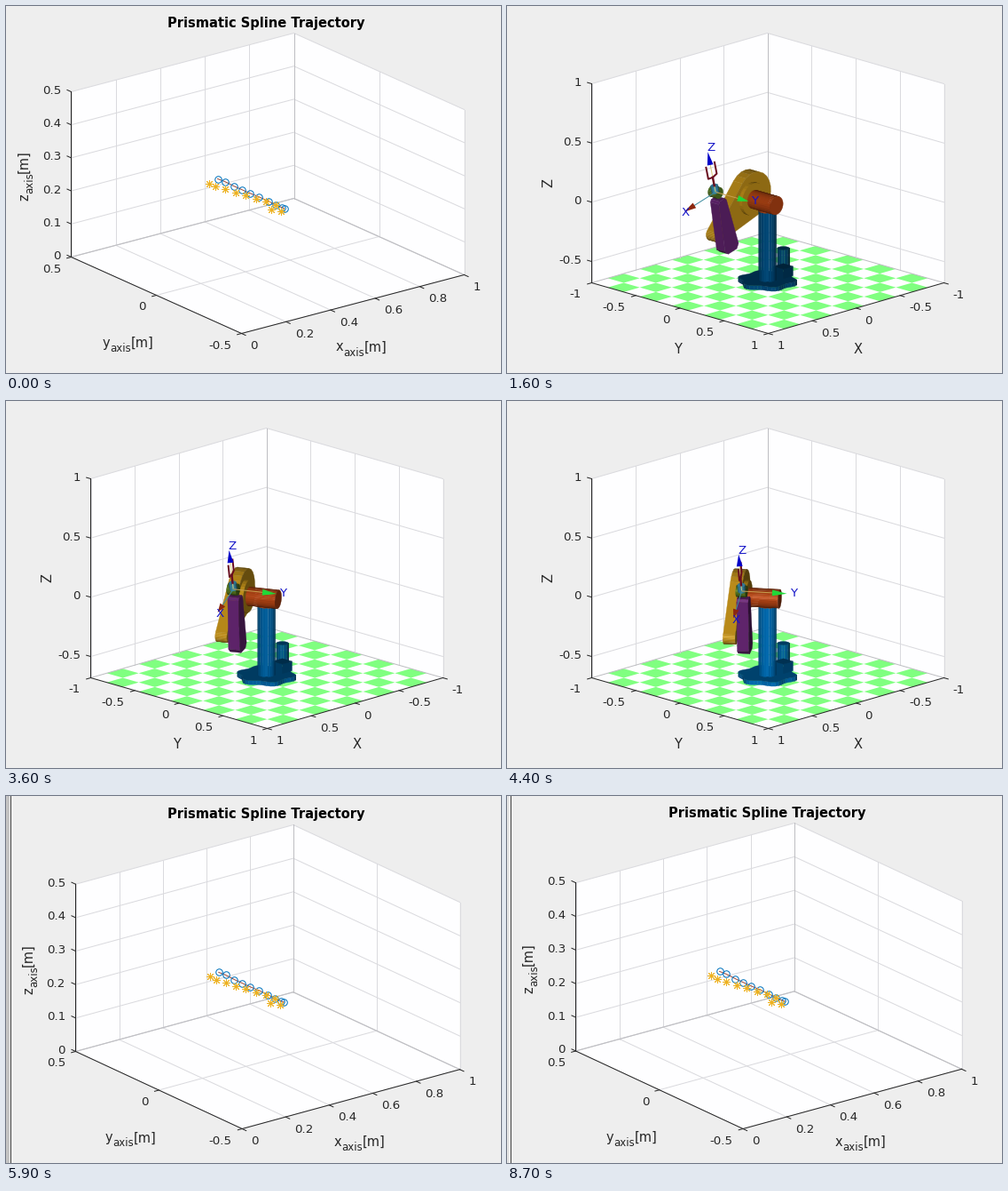
A matplotlib script that plays this animation: 558x413 px, repeating every 9000 ms.

```python
import numpy as np
import matplotlib.pyplot as plt
from matplotlib.animation import FuncAnimation
from matplotlib.collections import PolyCollection

W, H, DPI = 558, 413, 64
PX = 72 / DPI  # points per pixel
plt.rcParams["font.family"] = "DejaVu Sans"

fig = plt.figure(figsize=(W / DPI, H / DPI), dpi=DPI, facecolor="#eeeeee")
ax = fig.add_axes([0, 0, 1, 1])

INK, GRID, EDGE = "#262626", "#dadade", "#bebec2"
BLUE, ORANGE, OCHRE, PURPLE, GREEN, CYAN, RED = (np.array(c) / 255 for c in (
    (0, 114, 189), (217, 83, 25), (237, 177, 32), (126, 47, 142),
    (119, 172, 48), (77, 190, 238), (162, 20, 47)))


# ---------- 2D helpers, in pixels ----------
def line(pts, color, lw=1.0, **kw):
    p = np.asarray(pts, float) + 0.5
    ax.plot(p[:, 0], p[:, 1], color=color, lw=lw * PX, zorder=1, **kw)


def area(pts, color, **kw):
    ax.fill(*(np.asarray(pts, float) + 0.5).T, fc=color, lw=0, zorder=1, **kw)


def text(x, y, s, size=13.33, color=INK, **kw):
    ax.text(x, y, s, fontsize=size * PX, color=color, va="baseline", zorder=1,
            rotation_mode="anchor", **kw)


def axis_name(x, y, letter, upright=False):
    """Letter, lowered 'axis', then the unit."""
    first = 14.67 * (0.525 if letter == "z" else 0.592)
    parts = ((letter, 14.67, 0, 0), ("axis", 11.73, first, 5),
             ("[m]", 14.67, first + 23.5, 0))
    for s, size, run, drop in parts:
        if upright:
            text(x + drop, y - run, s, size, rotation=90)
        else:
            text(x + run, y + drop, s, size)


def chart(lb, fb, rb, h, left, right, up, tiles=0):
    """Open box from its left, front and right floor corners."""
    lb, fb, rb = (np.array(p, float) for p in (lb, fb, rb))
    a, b, z = fb - lb, rb - fb, np.array([0.0, -h])
    back = lb + b
    ua, ub = a / np.hypot(*a), b / np.hypot(*b)
    area([lb, lb + z, back + z, rb + z, rb, fb], "#fefeff")
    if tiles:
        cells = [[back + (i + p) * -b / tiles + (j + q) * a / tiles + 0.5
                  for p, q in ((0, 0), (1, 0), (1, 1), (0, 1))]
                 for i in range(tiles) for j in range(tiles) if (i + j) % 2]
        ax.add_collection(PolyCollection(cells, fc="#80ff80", ec="none", zorder=1))
    for f, _ in left:
        line([back + a * f + z, back + a * f], GRID)
        if not tiles:
            line([lb + a * f, rb - a * (1 - f)], GRID)
    for f, _ in right:
        line([lb + b * f + z, lb + b * f], GRID)
        if not tiles:
            line([lb + b * f, fb + b * f], GRID)
    for f, _ in up:
        line([lb + z * f, back + z * f, rb + z * f], GRID)
    line([lb, back, rb], EDGE)
    line([back, back + z], EDGE)
    line([lb + z, lb, fb, rb], INK)
    for f, s in left:
        p = lb + a * f
        line([p, p - ub * 5], INK)
        text(p[0] - 11, p[1] + 17.5, s, ha="right")
    for f, s in right:
        p = fb + b * f
        line([p, p + ua * 5], INK)
        text(p[0] + 10.5, p[1] + 18, s)
    for f, s in up:
        p = lb + z * f
        line([p, p - ua * 5], INK)
        text(p[0] - 11, p[1] + 3, s, ha="right")


# ---------- trajectory plot ----------
CIRCLES = np.array([(238, 194), (246, 197), (256, 202), (265, 206), (274, 210),
                    (284, 214), (295, 219), (303, 223), (310, 226), (313, 227)], float)
STARS = np.array([(228, 199), (235, 202), (246, 205), (258, 209), (269, 212),
                  (281, 216), (292, 219), (303, 223), (298, 228), (309, 230)], float)


def trajectory(x0, x1, y0, y1, title_y):
    sx, sy = (x1 - x0) / 443, (y1 - y0) / 337

    def fit(p):
        return (np.asarray(p, float) - (73, 31)) * (sx, sy) + (x0, y0)

    lb, fb, rb = fit((73, 282)), fit((265, 368)), fit((516, 302))
    h = 186 * sy
    chart(lb, fb, rb, h,
          [(0, "0.5"), (0.5, "0"), (1, "-0.5")],
          [(i / 5, f"{i / 5:g}") for i in range(6)],
          [(i / 5, f"{i / 10:g}") for i in range(6)])
    mx, my = (fb + rb) / 2, (lb + fb) / 2
    axis_name(mx[0] - 19, mx[1] + 53.5, "x")
    axis_name(my[0] - 60, my[1] + 59, "y")
    axis_name(lb[0] - 48, lb[1] - h / 2 + 30, "z", True)
    text(293.5, title_y, "Prismatic Spline Trajectory", 14.67, "black",
         weight="bold", ha="center")
    c, s = fit(CIRCLES), fit(STARS)
    line(c, "#a04a38")
    line(c, "#0072bd", 0, marker="o", ms=7.5 * PX, mfc="none", mew=PX)
    line(s, "#edb120", 0, marker=(8, 2, 0), ms=9 * PX, mew=PX)


# ---------- robot ----------
ORIGIN = np.array([293.2, 221.3])
PROJ = np.array([[-99, 28.5], [99.5, 28.5], [0, -133.0]])
VIEW = np.array([1, 1, 0.43])
LIGHT = np.array([0.65, 0.55, 0.35])
LIGHT = LIGHT / np.linalg.norm(LIGHT)
HALF = LIGHT + VIEW / np.linalg.norm(VIEW)
HALF = HALF / np.linalg.norm(HALF)
ARM, FORE, SIDE = 0.4318, 0.42, 0.13


def flat(p):
    return ORIGIN + np.asarray(p) @ PROJ


def shade(color, n, gain):
    lum = 0.3 + 0.5 * max(0, n @ LIGHT)
    gloss = 0.16 * max(0, n @ HALF) ** 40
    return tuple(np.clip((color * lum + gloss) * gain, 0, 1))


def solid(base, d, color, gain=1.0):
    """Extrude a 3D outline along d and paint the faces turned to the viewer."""
    base, d = np.asarray(base, float), np.asarray(d, float)
    mid = base.mean(0) + d / 2
    faces, tones = [], []
    for a, b in zip(base, np.roll(base, -1, 0)):
        n = np.cross(b - a, d)
        n = n / np.linalg.norm(n)
        if n @ ((a + b + d) / 2 - mid) < 0:
            n = -n
        if n @ VIEW > 0:
            faces.append(flat([a, b, b + d, a + d]) + 0.5)
            tones.append(shade(color, n, gain))
    n = d / np.linalg.norm(d)
    cap = base + d
    if n @ VIEW < 0:
        n, cap = -n, base
    faces.append(flat(cap) + 0.5)
    tones.append(shade(color, n, gain))
    ax.add_collection(PolyCollection(faces, fc=tones, ec=tones, lw=0.4, zorder=1))


def disc(r, n=28, lobes=0.0):
    t = np.arange(n) * 2 * np.pi / n
    k = r + lobes * np.cos(6 * t)
    return np.c_[k * np.cos(t), k * np.sin(t)]


def taper(c1, r1, c2, r2, n=14):
    """Outline around two circles lying on one axis."""
    b = np.arccos((r1 - r2) / (c2 - c1))
    t1, t2 = np.linspace(b, 2 * np.pi - b, n), np.linspace(-b, b, n)
    return np.r_[np.c_[c1 + r1 * np.cos(t1), r1 * np.sin(t1)],
                 np.c_[c2 + r2 * np.cos(t2), r2 * np.sin(t2)]]


def upright(xy, z0, z1, color, gain, at=(0, 0)):
    base = np.c_[xy + np.array(at), np.full(len(xy), z0)]
    solid(base, (0, 0, z1 - z0), color, gain)


FORE_HALF = np.array([(-0.115, 0.05), (-0.08, 0.08), (0.34, 0.045), (0.36, 0.03)])
FORE_SHAPE = np.r_[FORE_HALF, FORE_HALF[::-1] * (1, -1)]
BLOCK = np.array([(-0.055, -0.055), (0.055, -0.055), (0.055, 0.055), (-0.055, 0.055)])


def robot(yaw, reach, height, tilt, gain):
    yaw, tilt = np.radians([yaw, tilt])
    ex = np.array([np.cos(yaw), np.sin(yaw), 0])
    ey = np.array([-np.sin(yaw), np.cos(yaw), 0])
    ez = np.array([0, 0, 1.0])

    def plate(shape, y0, y1, color, angle=0.0, at=(0, 0)):
        c, s = np.cos(angle), np.sin(angle)
        r = at[0] + shape[:, 0] * c - shape[:, 1] * s
        z = at[1] + shape[:, 0] * s + shape[:, 1] * c
        solid(np.outer(r, ex) + np.outer(z, ez) + y0 * ey, (y1 - y0) * ey, color)

    # Two-link inverse kinematics, elbow low
    dist = np.hypot(reach, height)
    inner = np.arccos((dist**2 + ARM**2 - FORE**2) / (2 * dist * ARM))
    lift = np.arctan2(height, reach) - inner
    elbow = ARM * np.cos(lift), ARM * np.sin(lift)
    lean = np.arctan2(height - elbow[1], reach - elbow[0])

    # Pedestal and arm
    upright(disc(0.222, 48, 0.02), -0.675, -0.64, BLUE, gain)
    upright(disc(0.048), -0.59, -0.42, BLUE, gain * 0.9, (-0.18, 0))
    upright(BLOCK, -0.66, -0.58, BLUE, gain * 0.75, (-0.195, -0.015))
    plate(taper(-0.05, 0.185, ARM, 0.055), -0.285, -0.185, OCHRE, lift)
    plate(disc(0.135), -0.185, -0.15, OCHRE)
    upright(disc(0.072, 20), -0.645, -0.055, BLUE, gain)
    upright(disc(0.072), -0.065, -0.03, ORANGE, 1)
    plate(disc(0.076), -0.15, 0.1, ORANGE)
    plate(FORE_SHAPE, -0.165, -0.07, PURPLE, lean, elbow)
    plate(disc(0.046), -0.17, -0.09, GREEN * 0.85, 0, (reach, height))

    # Tool
    root = reach * ex - SIDE * ey + height * ez
    tx = np.cos(tilt) * ex - np.sin(tilt) * ez
    tz = np.sin(tilt) * ex + np.cos(tilt) * ez
    ring = disc(0.03, 16)
    solid(root + np.outer(ring[:, 0], tx) + np.outer(ring[:, 1], ey), 0.06 * tz, CYAN)

    def tool(x, z):
        return flat(root + x * tx + z * tz)

    axes = ((tz, "#d8c878", "#0000c8", "Z"), (ey, "#c8a050", "#20d838", "Y"),
            (tx, "#3c8ca0", "#8c2810", "X"))
    o = flat(root)
    for v, thin, _, _ in axes:
        line([o, flat(root + 0.26 * v)], thin)
    dark = tuple(RED * 0.65)
    line([tool(0, 0.06), tool(0, 0.135)], dark, 2.4)
    for s in (-1, 1):
        line([tool(0, 0.135), tool(s * 0.05, 0.145), tool(s * 0.05, 0.25)], dark, 2)
    for v, _, cone, s in axes:
        tip, foot = flat(root + 0.37 * v), flat(root + 0.25 * v)
        side = np.array([foot[1] - tip[1], tip[0] - foot[0]])
        side = side / np.hypot(*side) * 3.4
        area([tip, foot + side, foot - side], cone)
        p = flat(root + 0.4 * v)
        text(p[0], p[1] + 3, s, color="#1414c8")


def scene(pose):
    half = ["-1", "-0.5", "0", "0.5", "1"]
    chart((95, 311), (294, 368), (492, 311), 224,
          [(i / 4, s) for i, s in enumerate(half)],
          [(i / 4, s) for i, s in enumerate(half[::-1])],
          [(0.107, "-0.5"), (0.405, "0"), (0.702, "0.5"), (1, "1")], tiles=11)
    text(396, 391, "X", 14.67, ha="center")
    text(192.5, 391, "Y", 14.67, ha="center")
    text(51, 199.5, "Z", 14.67, ha="center", rotation=90)
    if pose is not None:
        robot(*pose)


# ---------- pointer and axes toolbar ----------
def ibeam(x, y):
    for color, lw in (("white", 2.4), ("black", 1)):
        line([(x - 3, y - 6), (x + 3, y - 6)], color, lw)
        line([(x, y - 6), (x, y + 6)], color, lw)
        line([(x - 3, y + 6), (x + 3, y + 6)], color, lw)


def pointer(x, y):
    shape = np.array([(0, 0), (0, 15), (4, 12), (6, 17), (8, 16), (6, 11), (10, 11)])
    area(shape + (x, y), "black")
    line(np.r_[shape, shape[:1]] + (x, y), "white", 0.8)


def toolbar(x0, alpha):
    for i in range(7):
        x, y = x0 + 7 + 23.5 * i, 20
        if i % 2:
            line([(x, y)], "#8c8c8c", 0, marker="o", ms=9 * PX, mfc="none",
                 mew=PX, alpha=alpha)
        else:
            line([(x - 5, y - 5), (x + 5, y - 5), (x + 5, y + 5), (x - 5, y + 5),
                  (x - 5, y - 5)], "#8c8c8c", alpha=alpha)


# ---------- timeline ----------
MOVES = [1200, 2300, 2700, 3000, 3400, 3600, 4100, 4400, 4800, 5100]
PROGRESS = [-0.1, 0, 0.18, 0.47, 0.76, 1, 1.3, 1.5, 1.8, 2]
# yaw, reach, height, tilt, pedestal brightness
KEYS = [(0.5, 2, 24.3, 43.5), (0.464, 0.462, 0.414, 0.431),
        (0.166, 0.165, 0.179, 0.175), (14, 14.5, 15, 25), (0.8, 0.8, 1.05, 1.3)]


def pose_at(t):
    i = np.searchsorted(MOVES, t, "right") - 1
    if i < 0:
        return 0, 0.435, 0.42, 0, 0.8
    return tuple(np.interp(PROGRESS[i], [-0.1, 0, 1, 2], k) for k in KEYS)


def draw(k):
    t = 100 * k
    ax.clear()
    ax.set(xlim=(0, W), ylim=(H, 0))
    ax.axis("off")
    if t < 600:
        trajectory(73, 516, 31, 368, 24)
    elif t < 5900:
        scene(pose_at(t) if t >= 700 else None)
        if 800 <= t < 1000:
            ibeam(250, 131)
        if 1400 <= t < 1600:
            f = (t - 1400) / 100
            pointer(248 + 75 * f, 119 - 70 * f)
        if 2000 <= t < 2300:
            toolbar(334, 0.5 if t < 2100 else 1)
    else:
        late = t >= 6000
        if late:
            trajectory(77, 512, 31, 374, 24)
        else:
            trajectory(78, 511, 33, 374, 25)
        edge = 3 if late else 4
        tone = "#e4e4e4" if t >= 8700 else "#c3c3c3"
        area([(-0.5, -1), (edge - 0.5, -1), (edge - 0.5, H), (-0.5, H)], tone)
        line([(edge, -1), (edge, H)], "#404040")
        if 6200 <= t < 6500:
            f = (t - 6200) / 100
            pointer(313 + 30 * f, 50 - 15 * f)
        if 6400 <= t < 7000:
            toolbar(351, 1 if 6500 <= t < 6800 else 0.5)
    return []


anim = FuncAnimation(fig, draw, frames=90, interval=100, init_func=lambda: [],
                     repeat=True, repeat_delay=0, blit=False)
plt.show()
```
